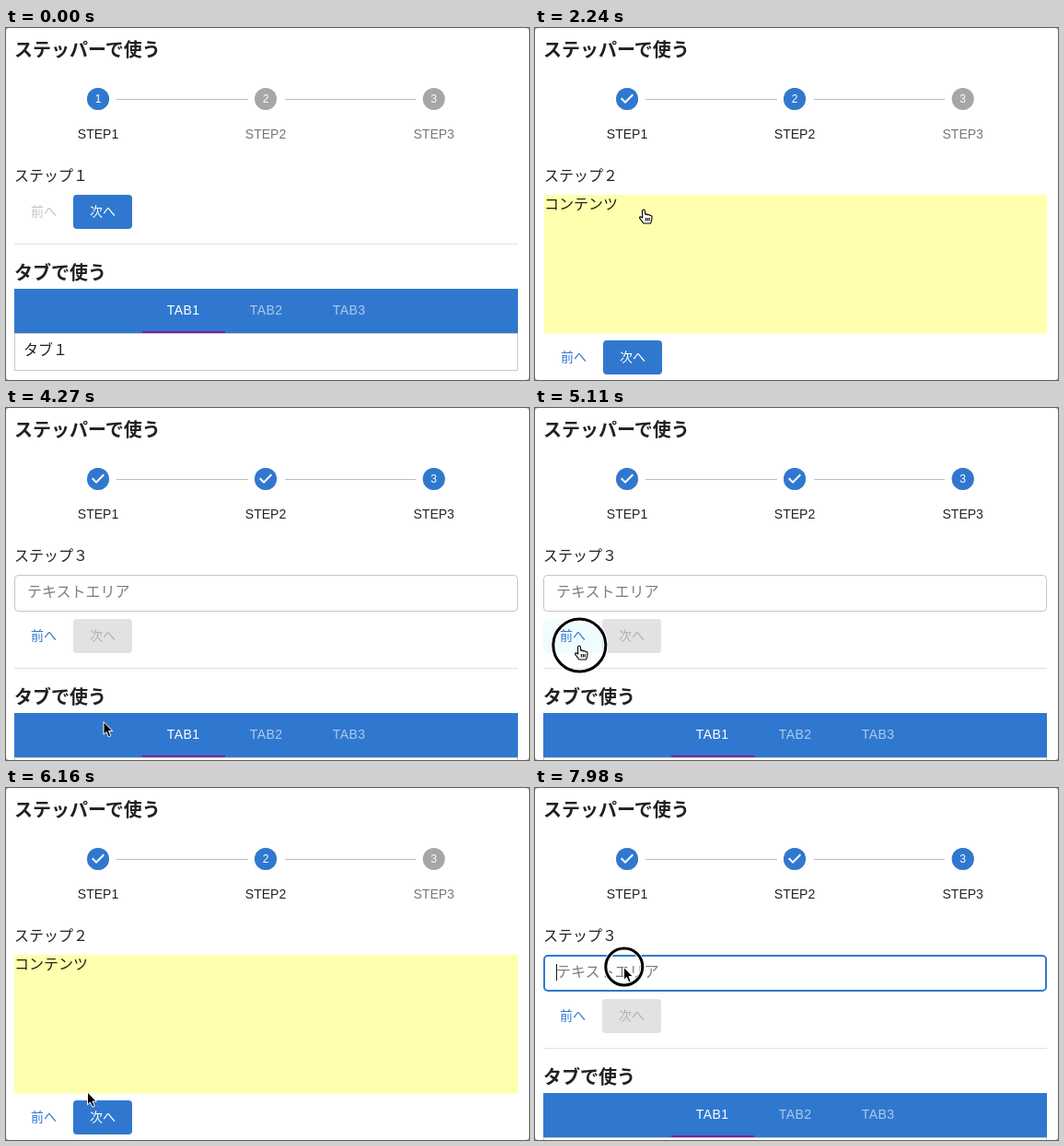
Recreate the animation shown at these times as an HTML page. Size 568 by 382 pixels, loop 8000 ms.

```html
<!DOCTYPE html>
<html lang="ja">
<head>
<meta charset="utf-8">
<title>Stepper</title>
<style>
  html, body { margin: 0; width: 100%; height: 100%; overflow: hidden; background: #aaa; }
  svg { display: block; font: 16px "Liberation Sans", "Noto Sans CJK JP", "Noto Sans CJK", sans-serif; }
  text { fill: #212121; white-space: pre; }
  .head { font-size: 20px; font-weight: bold; }
  .small { font-size: 14px; }
  .num { font-size: 12px; fill: #fff; }
  .mid { text-anchor: middle; }
  .white { fill: #fff; }
  .blue { fill: #3078cf; }
  .tab { font-size: 14px; letter-spacing: .4px; fill: #fff; }
</style>
</head>
<body>
<svg id="stage" width="568" height="382" viewBox="0 0 568 382"></svg>
<script>
const WIDTH = 547, LOOP = 8000, TICK = 70;
const BLUE = '#3078cf';
const stage = document.getElementById('stage');

const text = (x, y, s, cls = '', more = '') => `<text x="${x}" y="${y}" class="${cls}" ${more}>${s}</text>`;
const rect = (x, y, w, h, fill, more = '') =>
  `<rect x="${x}" y="${y}" width="${w}" height="${h}" fill="${fill}" ${more}/>`;

const stepX = [100, 282, 464.7];
const stepMark = (x, i) => `
  <g transform="translate(${x} 77)">
    <circle r="12" fill="#a6a6a6"/><circle r="12" class="blue" id="dot${i}"/>
    ${text(0, 4.2, i, 'num mid', `id="num${i}"`)}
    <path id="check${i}" d="M-2 5l-5-5 1.4-1.4 3.6 3.6 7.6-7.6L7-4z" fill="#fff"/>
  </g>
  ${text(x, 120, 'STEP' + i, 'small mid', `id="label${i}"`)}`;

// Back and next buttons of one pane; each has a hover layer
const buttons = (i, y) => `
  ${rect(9, y, 64, 37, '#f0fdff', `rx="4" opacity="0" id="back${i}"`)}
  ${text(27, y + 23, '前へ', 'small', `style="fill:${i == 1 ? '#c4c4c4' : BLUE}"`)}
  ${rect(73, y, 64, 37, i == 3 ? '#e2e2e2' : BLUE, 'rx="4"')}
  ${rect(73, y, 64, 37, '#2a65b8', `rx="4" opacity="0" id="next${i}"`)}
  ${text(91, y + 23, '次へ', 'small', `style="fill:${i == 3 ? '#b2b2b2' : '#fff'}"`)}`;

const paneBody = [
  buttons(1, 181),
  rect(9, 181, WIDTH, 150.5, '#ffffad') + text(9, 197, 'コンテンツ') + buttons(2, 339),
  rect(9.5, 181.5, WIDTH - 1, 39, 'none', 'rx="4" id="field"') +
    text(23, 205, 'テキストエリア', '', 'style="fill:#7d7d7d"') +
    rect(23, 191, 1, 18, '#111', 'id="caret"') + buttons(3, 229)
];
const panes = paneBody.map((body, i) =>
  `<g id="pane${i + 1}">${text(9, 165.5, 'ステップ' + '１２３'[i])}${body}</g>`).join('');

stage.innerHTML = `
  <clipPath id="clip"><rect id="window" x="9" y="140" width="${WIDTH}"/></clipPath>
  ${rect(0, 0, 568, 382, '#fff', 'rx="4"')}
  ${text(9, 30.5, 'ステッパーで使う', 'head')}
  ${rect(120, 77, 143, 1, '#bdbdbd')}${rect(303, 77, 142, 1, '#bdbdbd')}
  ${stepX.map((x, i) => stepMark(x, i + 1)).join('')}
  <g clip-path="url(#clip)">${panes}</g>
  <g id="footer">
    ${rect(9, 234, WIDTH, 1, '#e0e0e0')}
    ${text(9, 272.5, 'タブで使う', 'head')}
    ${rect(9.5, 331.5, WIDTH - 1, 40, 'none', 'stroke="#c8c8c8"')}
    ${rect(9, 283, WIDTH, 48, BLUE)}
    ${rect(148, 329, 90, 2, '#7f1fa6')}
    ${[1, 2, 3].map(n => text(84.8 + n * 90, 311, 'TAB' + n, 'tab', n > 1 ? 'opacity=".6"' : '')).join('')}
    ${text(19, 355, 'タブ１')}
  </g>
  <g id="ring" fill="none"><circle stroke="#fff" stroke-width="5"/><circle stroke="#000" stroke-width="3"/></g>
  <g id="cursor">
    <path id="arrow" fill="#000" stroke="#fff" d="M0 0V13.8l3-2.8 2.3 5.3 2.5-1.1-2.3-5.1h4.3z"/>
    <g id="hand" stroke="#000" stroke-width="1.1" stroke-linejoin="round">
      <path fill="#fff" d="M-1.2 9L-1.6 1.2Q0-1.2 1.3 1L1.9 5.5Q3.4 4 4.5 6Q6 4.8 7 6.7Q9.2 6 9 8.5Q9 12 7.5 15H0Q-2.5 11.5-4.4 9.3Q-4.6 6.6-1.2 9z"/>
      <path d="M2.3 9v3.5M4.3 9v3.5M6.2 9v3.5"/>
    </g>
  </g>`;

const el = {};
stage.querySelectorAll('[id]').forEach(e => el[e.id] = e);
const set = (id, name, value) => el[id].setAttribute(name, value);
const show = (id, on) => set(id, 'visibility', on ? 'visible' : 'hidden');
const clamp = v => Math.min(1, Math.max(0, v));

function bezier(x1, y1, x2, y2) {
  const at = (a, b, s) => 3 * (1 - s) ** 2 * s * a + 3 * (1 - s) * s * s * b + s ** 3;
  return x => {
    if (x <= 0 || x >= 1) return clamp(x);
    let lo = 0, hi = 1;
    for (let i = 0; i < 30; i++) {
      const m = (lo + hi) / 2;
      if (at(x1, x2, m) < x) lo = m; else hi = m;
    }
    return at(y1, y2, lo);
  };
}
const slideEase = bezier(.25, .1, .25, 1), colorEase = bezier(.4, 0, .2, 1);

// press time, time the step changes, new step
const clicks = [[1820, 1911, 2], [3500, 3582, 3], [5040, 5220, 2], [6790, 6872, 3], [7980, 8000, 3]];
const bottoms = [218, 376, 266];
// time, x, y of the pointer
const path = [
  [420, 268, 378], [770, 160, 250], [980, 112, 174], [1190, 98, 181], [1610, 118, 197],
  [2590, 118, 197], [2870, 112, 275], [3080, 114, 340], [3220, 118, 354],
  [4200, 118, 354], [4480, 70, 300], [4690, 42, 245], [4830, 48, 258],
  [5810, 48, 258], [6160, 88.5, 330], [6510, 100, 350],
  [7350, 100, 350], [7630, 98, 270], [7910, 96.5, 194.5], [8000, 96.5, 194.5]
];
const hands = [[1260, 2520], [3080, 3582], [4690, 5880], [6370, 6872]];
const hovers = [['next1', 1260, 2500], ['next2', 3080, 3950], ['back3', 4690, 5600], ['next2', 6370, 7230]];

function pointer(t) {
  const i = path.findIndex(p => p[0] > t);
  const [a, b] = [path[i - 1], path[i]];
  const k = (t - a[0]) / (b[0] - a[0]);
  return [a[1] + (b[1] - a[1]) * k, a[2] + (b[2] - a[2]) * k];
}

function draw(t) {
  let from = 1, step = 1, start = -1000;
  for (const [, time, next] of clicks)
    if (t >= time) [from, step, start] = [step, next, time];
  const pos = from + (step - from) * slideEase((t - start) / 350);
  const fade = colorEase((t - start) / 150);

  for (let i = 1; i <= 3; i++) {
    set('pane' + i, 'transform', `translate(${Math.round((i - pos) * WIDTH)} 0)`);
    const was = +(i <= from), now = +(i <= step);
    const lit = was + (now - was) * fade;
    set('dot' + i, 'opacity', lit);
    el['label' + i].style.fill = `rgba(0,0,0,${.54 + .33 * lit})`;
    show('check' + i, i < step);
    show('num' + i, i >= step);
  }
  const bottom = bottoms[step - 1];
  set('window', 'height', bottom - 140);
  set('footer', 'transform', `translate(0 ${bottom - 218})`);

  for (const [id] of hovers) set(id, 'opacity', 0);
  for (const [id, a, b] of hovers)
    if (t >= a && t < b) set(id, 'opacity', colorEase((t - a + TICK) / 250));

  const focus = t >= 7980, over = t >= 7840;
  set('field', 'stroke', focus ? BLUE : over ? '#212121' : '#c4c4c4');
  set('field', 'stroke-width', focus ? 2 : 1);
  // keep the thicker focus border inside the field box
  const inset = focus ? 1 : .5;
  set('field', 'x', 9 + inset);
  set('field', 'y', 181 + inset);
  set('field', 'width', WIDTH - 2 * inset);
  set('field', 'height', 40 - 2 * inset);
  show('caret', focus);

  const visible = t >= path[0][0];
  const [x, y] = visible ? pointer(t) : [0, 0];
  const hand = hands.some(([a, b]) => t >= a && t < b);
  set('cursor', 'transform', `translate(${x} ${y})`);
  show('arrow', visible && !hand);
  show('hand', visible && hand);

  const press = clicks.find(([a, b]) => t >= a && t < b);
  show('ring', press);
  if (press) {
    set('ring', 'transform', `translate(${x + .3} ${y - .5})`);
    for (const c of el.ring.children) c.setAttribute('r', t - press[0] < TICK ? 20 : 28.5);
  }
}

const begin = performance.now();
function frame() {
  const t = (performance.now() - begin) % LOOP;
  draw(Math.floor(t / TICK) * TICK);
  requestAnimationFrame(frame);
}
frame();
</script>
</body>
</html>
```
